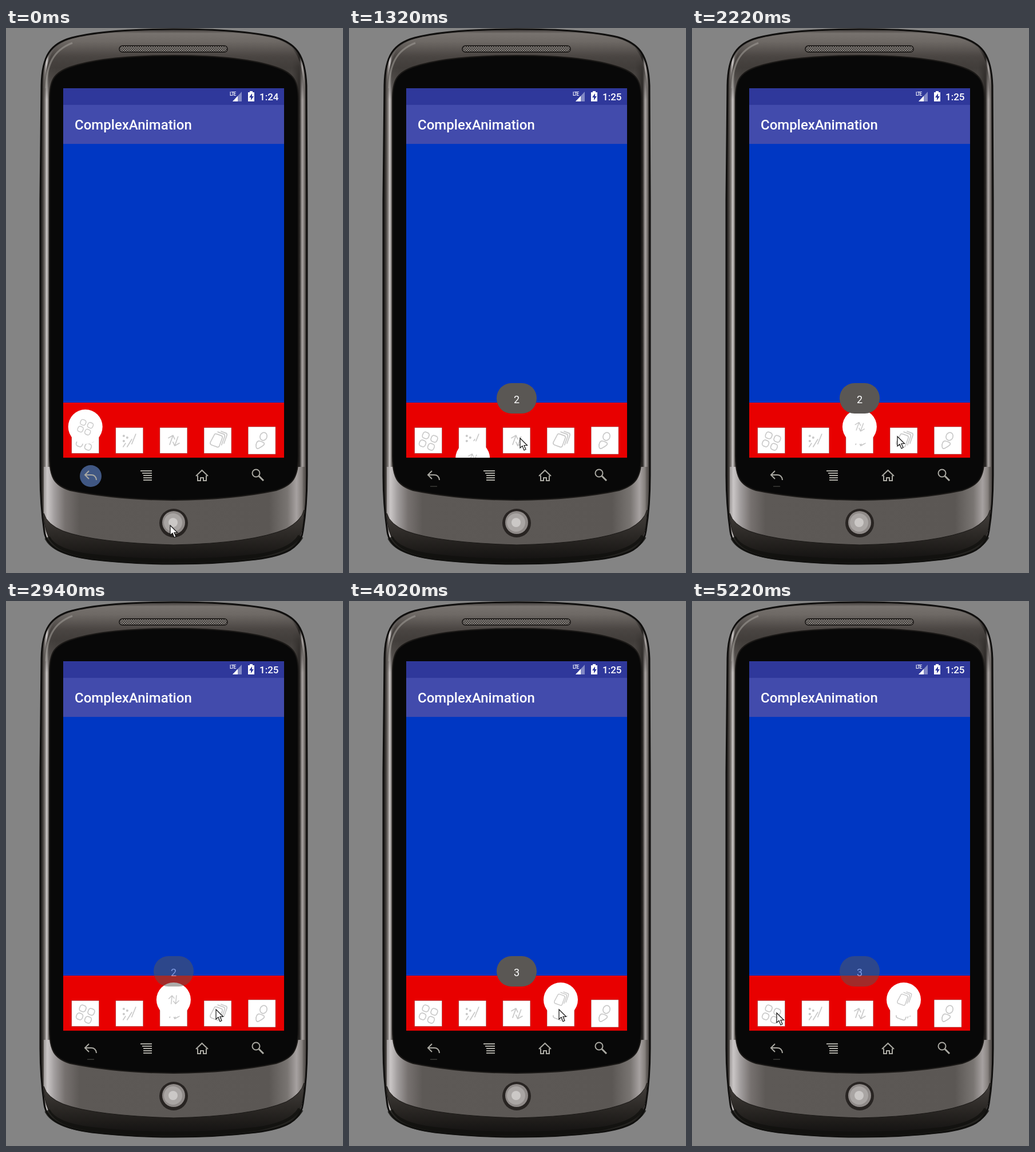
Recreate the animation shown at these times as an HTML page. Size 589 by 950 pixels, loop 5250 ms.

```html
<!DOCTYPE html>
<html lang="en">
<head>
<meta charset="utf-8">
<title>ComplexAnimation</title>
<style>
html, body { margin: 0; width: 100%; height: 100%; overflow: hidden; background: #848484; }
svg { display: block; }
text { font-family: Roboto, sans-serif; font-weight: 500; fill: #fff; }
.line { fill: none; stroke: #c9c9c9; stroke-width: 1.7; stroke-linecap: round; stroke-linejoin: round; }
.nav { fill: none; stroke: #aaa9a2; stroke-width: 2; }
</style>
</head>
<body>
<svg width="589" height="950" viewBox="0 0 589 950">
  <defs>
    <linearGradient id="sides" gradientUnits="userSpaceOnUse" x1="59" x2="528" y1="0" y2="0">
      <stop offset="0" stop-color="#11100f"/><stop offset=".011" stop-color="#3d3936"/>
      <stop offset=".019" stop-color="#77726f"/><stop offset=".026" stop-color="#d0cccb"/>
      <stop offset=".034" stop-color="#65605d"/><stop offset=".06" stop-color="#5b5754"/>
      <stop offset=".94" stop-color="#5b5754"/><stop offset=".968" stop-color="#24211f"/>
      <stop offset=".978" stop-color="#aaa5a3"/><stop offset=".985" stop-color="#817c79"/>
      <stop offset=".992" stop-color="#3a3633"/><stop offset="1" stop-color="#11100f"/>
    </linearGradient>
    <linearGradient id="cap" gradientUnits="userSpaceOnUse" x1="0" x2="0" y1="2" y2="125">
      <stop offset="0" stop-color="#35312f"/><stop offset=".06" stop-color="#77726e"/>
      <stop offset=".18" stop-color="#6d6864"/><stop offset=".38" stop-color="#4b4643"/>
      <stop offset=".55" stop-color="#3b3734" stop-opacity=".8"/><stop offset="1" stop-color="#3b3734" stop-opacity="0"/>
    </linearGradient>
    <linearGradient id="chin" gradientUnits="userSpaceOnUse" x1="64" x2="524" y1="0" y2="0">
      <stop offset="0" stop-color="#8f8b8a"/><stop offset=".018" stop-color="#cac6c6"/>
      <stop offset=".045" stop-color="#a29e9e"/><stop offset=".085" stop-color="#76716f"/>
      <stop offset=".14" stop-color="#5d5956"/><stop offset=".86" stop-color="#5b5754"/>
      <stop offset=".93" stop-color="#797572"/><stop offset=".965" stop-color="#a6a1a0"/>
      <stop offset=".985" stop-color="#87827f"/><stop offset="1" stop-color="#3d3936"/>
    </linearGradient>
    <linearGradient id="base" x1="0" x2="0" y1="0" y2="1">
      <stop offset="0" stop-color="#45413e"/><stop offset=".55" stop-color="#282522"/><stop offset="1" stop-color="#11100f"/>
    </linearGradient>
    <pattern id="mesh" width="4" height="4" patternUnits="userSpaceOnUse">
      <path fill="#8b8783" d="M0 0h4v4H0z"/><path fill="#393532" d="M0 0h2v2H0zM2 2h2v2H2z"/>
    </pattern>
    <clipPath id="screen"><path d="M100 105H486V749H100z"/></clipPath>

    <g id="icon0" class="line" transform="rotate(22)">
      <rect x="-13" y="-12" width="11" height="11" rx="4"/><rect x="3" y="-12" width="11" height="11" rx="4"/>
      <rect x="-13" y="3" width="11" height="11" rx="4"/><rect x="3" y="3" width="11" height="11" rx="4"/>
    </g>
    <g id="icon1" class="line">
      <path stroke-width="4" d="M-10-8h.1M-4-5h.1M-10 1h.1"/>
      <path d="M4 6L11-11M-4 11L4-2M-11 11L-7 5"/>
    </g>
    <g id="icon2" class="line" transform="rotate(20)" stroke-width="2.2">
      <path d="M-4 9V-8M-10-1L-4-8L1-3M5-9V8M11 1L5 8L0 3"/>
    </g>
    <g id="icon3" class="line" transform="rotate(20)">
      <path d="M-9-7Q-9-10-5-10H3Q6-10 6-7V8Q6 11 3 11H-7Q-11 11-11 7zM-5-14H6Q9-14 9-10V5M0-17H9Q12-17 12-13V1"/>
    </g>
    <g id="icon4" class="line">
      <ellipse cx="3" cy="-7" rx="6" ry="7" transform="rotate(20 3 -7)"/>
      <path d="M-10 11C-11 6-8 0-4 1C0 2 6 4 4 7C2 10-3 12-6 14Q-9 15-10 11z"/>
    </g>
  </defs>

  <path fill="#848484" d="M0 0H589V950H0z"/>
  <path id="body" fill="url(#sides)" stroke="#100f0e" stroke-width="3" d="M293 2C200 2 145 9 115 17C78 27 63 48 62 100L60 300V780C60 820 63 850 67 878C71 906 100 919 150 926Q220 934 293 934Q370 934 437 926C490 919 515 906 519 876C524 845 526 820 526 780V300L525 100C523 48 508 27 470 16C440 9 385 2 293 2z"/>
  <path fill="url(#cap)" d="M293 4C200 4 145 11 115 19C81 29 67 50 66 125H522C520 50 505 29 469 18C440 11 385 4 293 4z"/>
  <path fill="none" stroke="#a39e9a" stroke-width="3" opacity=".55" d="M70 105C71 64 82 39 116 26"/>
  <path fill="url(#chin)" d="M66 765H522V840Q516 858 490 872Q430 897 293 900Q155 896 100 876Q72 865 66 845z"/>
  <path fill="url(#base)" stroke="#1a1816" d="M66 846Q72 866 100 877Q155 897 293 901Q430 898 490 873Q516 859 521 840C519 890 515 907 440 923Q375 932 293 932Q215 932 150 924C80 913 69 895 66 846z"/>
  <path fill="none" stroke="#11100e" stroke-width="10" opacity=".75" d="M72 888Q84 914 150 922Q220 930 293 930Q370 930 438 922Q500 913 515 886"/>
  <path fill="#080808" stroke="#1b1917" stroke-width="2" d="M293 48C215 48 150 55 112 68C83 78 76 92 76 125V745C76 783 84 797 112 806Q190 822 293 823Q397 822 472 806C501 797 511 784 511 745V125C511 93 503 79 474 69C435 55 370 48 293 48z"/>
  <rect x="198" y="31" width="189" height="11" rx="5.5" fill="url(#mesh)" stroke="#24211f" stroke-width="2"/>
  <circle cx="293" cy="863" r="25" fill="#282422"/>
  <circle cx="293" cy="862" r="20" fill="#8f8a88"/>
  <circle cx="292" cy="862" r="16" fill="#a9a5a3"/>
  <circle cx="292" cy="862" r="8" fill="#cbc8c6"/>

  <g clip-path="url(#screen)">
    <path fill="#0037c3" d="M100 105H486V749H100z"/>
    <path fill="#2f389b" d="M100 105H486V134H100z"/>
    <path fill="#424bac" d="M100 134H486V202H100z"/>
    <path fill="#e80000" d="M100 653H486V749H100z"/>
    <text x="120" y="177" font-size="24">ComplexAnimation</text>
    <text id="clock" x="443" y="126" font-size="17"></text>
    <text x="391" y="118" font-size="8.5" letter-spacing="-1.2">LTE</text>
    <path fill="#8289c5" d="M412 111V128H396z"/>
    <path fill="#fff" d="M405 118.500V128H396z"/>
    <path fill="#fff" d="M426 110h5v2h3v16h-11v-16h3z"/>
    <path fill="#2f389b" d="M430 114l-5 7h3v5l5-7h-3z"/>
    <g id="tiles"></g>
    <g id="ball"><circle r="30" fill="#fff"/><use id="ballIcon"/></g>
    <g id="toast">
      <rect x="258" y="619" width="70" height="53" rx="26" fill="#5a5754"/>
      <text id="digit" x="293" y="654" font-size="18" text-anchor="middle" style="font-weight:400"></text>
    </g>
  </g>

  <circle id="press" cx="148" cy="781" r="19" fill="#405783"/>
  <path class="nav" d="M145 772L138 779L145 786M139 779H149Q157 779 158 788"/>
  <path id="mark" stroke="#55544f" d="M142 799H154"/>
  <path class="nav" d="M235 772H255M238 776H255M240 780H255M240 784H255M240 788H255"/>
  <path class="nav" d="M332 781L342.500 771L353 781M335 780V789H340V784H345V789H350V780"/>
  <g class="nav"><circle cx="437" cy="776" r="6.500"/><path stroke-width="3" d="M442 781L450 789"/></g>
  <path id="cursor" fill="#fff" stroke="#111" stroke-width="1.200" d="M0 0V17L4 13.500L7 21L10 19.500L7 12.500H12.500z"/>
</svg>
<script>
const LOOP = 5250;
const el = id => document.getElementById(id);
const place = (node, x, y, extra = "") => node.setAttribute("transform", `translate(${x} ${y}) ${extra}`);
const ramp = (t, a, b) => Math.min(1, Math.max(0, (t - a) / (b - a)));
const ease = p => (1 - Math.cos(Math.PI * p)) / 2;
const slot = i => 138.7 + 77.1 * i;

el("tiles").innerHTML = [0, 1, 2, 3, 4].map(i => {
  const h = i == 4 ? 48 : 45;
  return `<g transform="translate(${slot(i)} 719)">
    <rect x="-24" y="${-h / 2}" width="48" height="${h}" fill="#fff" stroke="#9b3030" stroke-width=".6"/>
    <use href="#icon${i}"/></g>`;
}).join("");

// Each hop swings the ball along a parabola between two tiles.
const hops = [
  { from: 0, to: 2, start: 1000 },
  { from: 2, to: 3, start: 3280 }
];
const HOP = 640;

// Cursor stops: time, x, y
const stops = [[0, 287, 867], [150, 287, 867], [750, 299, 715], [1500, 299, 715],
  [2100, 359, 712], [2400, 359, 712], [2750, 367, 712], [4250, 367, 712], [5050, 148, 718], [LOOP, 148, 718]];

function cursorAt(t) {
  const k = stops.findIndex(s => s[0] > t);
  const [t0, x0, y0] = stops[k - 1], [t1, x1, y1] = stops[k];
  const p = ease(ramp(t, t0, t1));
  return [x0 + (x1 - x0) * p, y0 + (y1 - y0) * p];
}

function draw(t) {
  const hop = t < hops[1].start ? hops[0] : hops[1];
  const p = ease(ramp(t, hop.start, hop.start + HOP));
  const x = slot(hop.from) + (slot(hop.to) - slot(hop.from)) * p;
  place(el("ball"), x, 695 + 220 * p * (1 - p));
  const item = t < hop.start ? hop.from : hop.to;
  const tilt = item == 2 ? -14 * ramp(t, 2220, 2940) : 0;
  el("ballIcon").setAttribute("href", "#icon" + item);
  el("ballIcon").setAttribute("transform", `rotate(${tilt}) scale(.85)`);

  const shown = t - hop.start;
  el("toast").setAttribute("opacity", ramp(shown, -50, 200) * (1 - ramp(shown, 1750, 2130)));
  el("digit").textContent = hop.to;

  el("clock").textContent = t < 420 ? "1:24" : "1:25";
  const press = 1 - ramp(t, 100, 400);
  el("press").setAttribute("opacity", press);
  el("mark").setAttribute("opacity", 1 - press);
  place(el("cursor"), ...cursorAt(t));
}

function tick() {
  draw(performance.now() % LOOP);
  requestAnimationFrame(tick);
}
tick();
</script>
</body>
</html>
```
